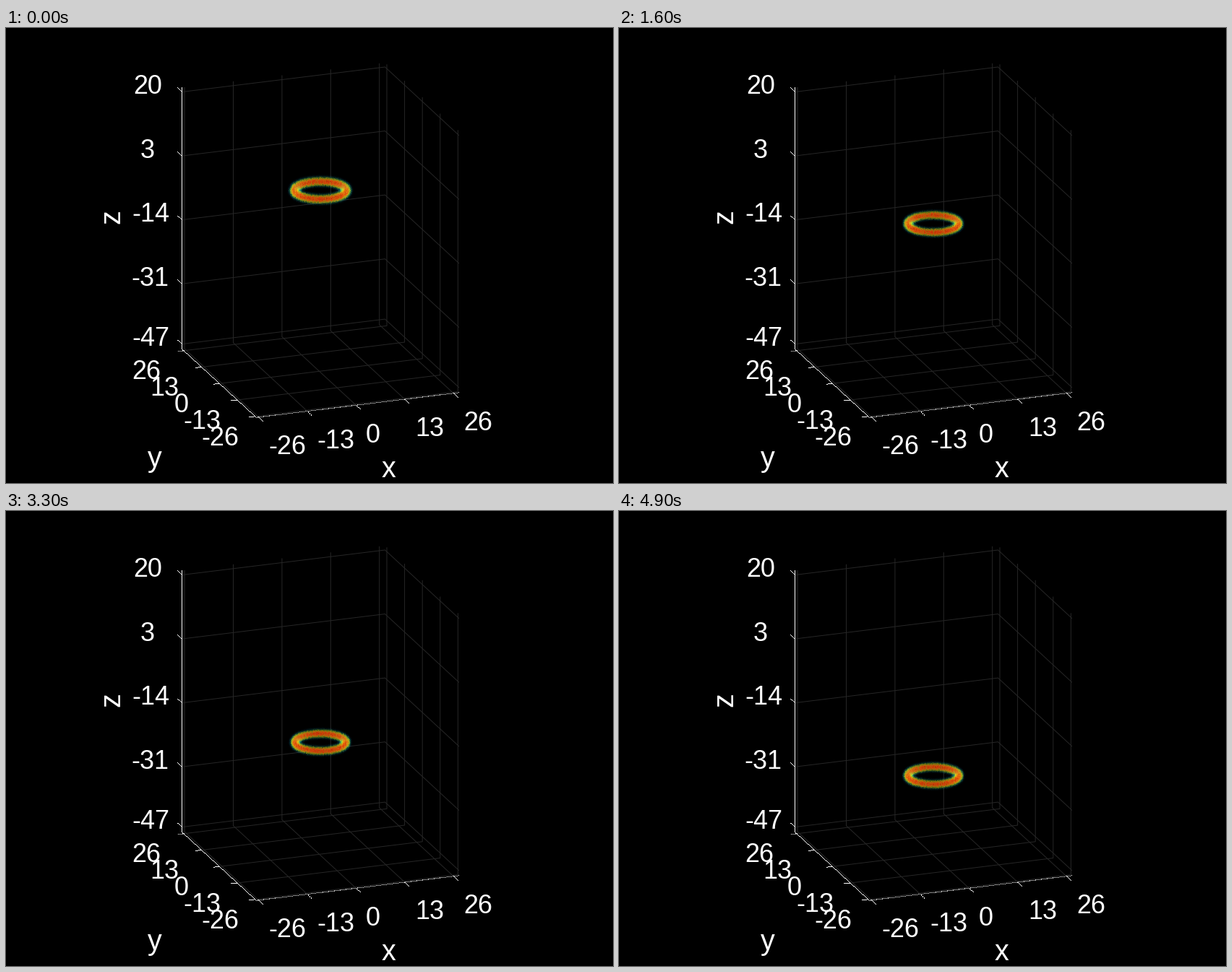
A matplotlib script for the animation above (5 s loop, 840 px wide and 630 px high).

```python
import numpy as np
import matplotlib.pyplot as plt
from matplotlib.animation import FuncAnimation

W, H, DPI = 840, 630, 100
FRAMES, INTERVAL = 50, 100
PX = 72 / DPI
GRID = (0.15, 0.15, 0.15)

plt.rcParams["font.family"] = "Liberation Sans"
fig = plt.figure(figsize=(W / DPI, H / DPI), dpi=DPI, facecolor="black")
ax = fig.add_axes([0, 0, 1, 1])
ax.axis("off")

# Projected box: left corner, edge vectors and grid steps in pixels
LEFT = np.array([243.0, 444.0])
X_EDGE = np.array([281.0, -34.5])
Y_EDGE = np.array([102.5, 94.8])
UP = np.array([0.0, -362.0])
X_TICKS = [LEFT + X_EDGE * (3.6 + 67.4 * i) / 281 for i in range(5)]
Y_TICKS = [LEFT + Y_EDGE * (2.5 + 24.6 * i) / 102.5 for i in range(5)]
Z_TICKS = [np.array([243.0, 88 + 5.21 * (20 - z)]) for z in (20, 3, -14, -31, -47)]

axis_pixels = np.zeros((H, W, 4))


def grid(*points):
    xs, ys = np.transpose(points)
    ax.plot(xs + 0.5, ys + 0.5, color=GRID, lw=PX,
            solid_capstyle="butt", zorder=1)


def white(start, end):
    """One-pixel line with hard steps."""
    steps = int(np.ceil(np.abs(end - start).max())) + 1
    cols, rows = np.rint(np.linspace(start, end, steps)).astype(int).T
    axis_pixels[rows, cols] = 1


def label(text, x, y, size=36, **style):
    ax.text(x, y, text, color="white", fontsize=size * PX, ha="center",
            zorder=4, **style)


def draw_box():
    for p in X_TICKS:
        grid(p + UP, p, p + Y_EDGE)
        white(p + Y_EDGE, p + Y_EDGE + (6, 5.5))
    for p in Y_TICKS:
        grid(p, p + X_EDGE, p + X_EDGE + UP)
        white(p, p + (-8, 0.8))
    for p in Z_TICKS:
        grid(p, p + X_EDGE, p + X_EDGE + Y_EDGE)
        white(p, p + (-6, -5.5))
    white(LEFT + UP, LEFT)
    white(LEFT, LEFT + Y_EDGE)
    white(LEFT + Y_EDGE, LEFT + Y_EDGE + X_EDGE)
    ax.imshow(axis_pixels, extent=(0, W, H, 0), aspect="auto",
              interpolation="nearest", zorder=2)


def draw_labels():
    ticks = [
        ("20", 196, 78), ("3", 196, 167), ("-14", 200, 255),
        ("-31", 199.5, 344), ("-47", 200, 427),
        ("26", 194, 473), ("13", 219, 496), ("0", 243, 519),
        ("-13", 271, 542), ("-26", 296.5, 565),
        ("-26", 389, 577), ("-13", 456, 569), ("0", 508, 561),
        ("13", 586.5, 552), ("26", 653, 544),
    ]
    for text, x, y in ticks:
        label(text, x, y + 12.6, va="baseline")
    label("x", 529, 622, 39.6, va="baseline")
    label("y", 205.5, 608, 39.6, va="baseline")
    label("z", 146, 261.5, 39.6, va="center", rotation=90)


SCALE, CENTER_X = 5.53, 435.0
HALF_W, HALF_H = 47, 24
SIN_E = 0.341
COS_E = np.sqrt(1 - SIN_E**2)
DEPTH = np.linspace(-9, 9, 61)


def jet(d):
    return np.clip(1.5 - np.abs(4 * d[..., None] - np.array([3, 2, 1])), 0, 1)


def ring_image(i, offset):
    """Volume-render a soft torus, front to back, as an RGBA array."""
    rng = np.random.default_rng(i)
    spread = np.exp(-i / 2)
    radius, width = 6.36 + 0.14 * spread, 1.45 + 0.12 * spread
    u = (np.arange(-HALF_W, HALF_W) + 0.5)[None, :, None] / SCALE
    v = (offset - np.arange(-HALF_H, HALF_H) - 0.5)[:, None, None] / SCALE
    y = v * SIN_E + DEPTH * COS_E
    z = v * COS_E - DEPTH * SIN_E
    rho2 = (np.hypot(u, y) - radius) ** 2 + z**2
    grain = (1 + 0.05 * rng.standard_normal((2 * HALF_H, 2 * HALF_W, 1))
             + 0.03 * rng.standard_normal((1, 2 * HALF_W, 1)))
    density = np.clip(0.92 * grain * np.exp(-rho2 / width**2), 0, 1)
    tau = 2.3 * density**4 * (DEPTH[1] - DEPTH[0])
    seen = np.exp(-(np.cumsum(tau, axis=2) - tau))
    weight = seen * (1 - np.exp(-tau))
    alpha = weight.sum(axis=2, keepdims=True)
    rgb = (weight[..., None] * jet(density)).sum(axis=2)
    return np.clip(np.concatenate([rgb / np.maximum(alpha, 1e-6), alpha], 2), 0, 1)


draw_box()
draw_labels()
ring = ax.imshow(np.zeros((2 * HALF_H, 2 * HALF_W, 4)), aspect="auto",
                 interpolation="nearest", zorder=3)
ax.set(xlim=(0, W), ylim=(H, 0))


def update(i):
    center = 224.8 + 2.89 * i
    row = round(center)
    ring.set_data(ring_image(i, center - row))
    ring.set_extent((CENTER_X - HALF_W, CENTER_X + HALF_W,
                     row + HALF_H, row - HALF_H))
    return [ring]


anim = FuncAnimation(fig, update, frames=FRAMES, interval=INTERVAL,
                     repeat=True, repeat_delay=0, blit=False)
plt.show()
```
